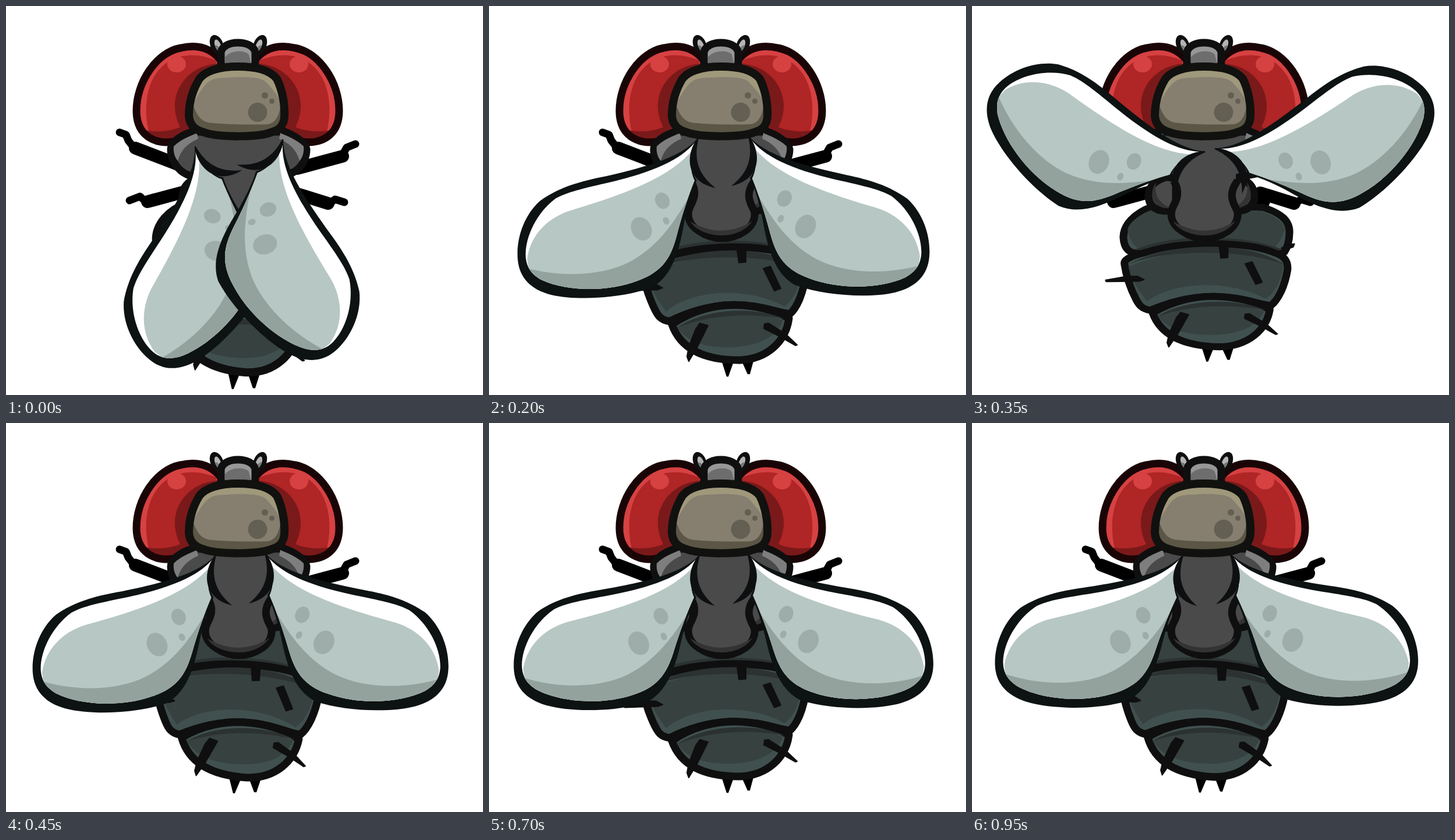
An HTML page that plays this animation: 819 px wide and 668 px high, repeating every 1000 ms.

```html
<!DOCTYPE html>
<html>
<head>
<meta charset="utf-8">
<title>Fly</title>
<style>
html, body { margin: 0; width: 100%; height: 100%; overflow: hidden; background: #fff; }
svg { display: block; width: 100vw; height: 100vh; }
.leg path { fill: none; stroke: #000; stroke-linecap: round; stroke-linejoin: round; stroke-width: 13; }
.leg .thick { stroke-width: 22; }
.line { stroke: #0f0f0f; stroke-width: 13; stroke-linejoin: round; }
.light { fill: #40504f; }
.main { fill: #364140; }
.shade { fill: #2b3231; }
.gray { fill: #4a4a4a; }
.dark { fill: #333; }
.rim { fill: #7e7e7e; }
</style>
</head>
<body>
<svg viewBox="0 0 819 668">
<defs>
  <path id="eyeShape" d="M371 96C352 70 326 66 300 72C257 80 224 132 224 180C224 215 245 233 275 234C295 234 310 225 322 213Z"/>
  <path id="headShape" d="M398 104C435 104 455 112 465 125C475 145 479 170 478 190C477 205 470 212 458 216C435 226 365 226 340 217C325 213 315 205 314 188C314 165 320 145 332 125C342 112 365 104 398 104Z"/>
  <path id="wingShape" d="M357 234C330 262 280 280 190 292C150 298 130 301 110 310C75 332 52 373 51 405C51 425 60 437 75 447C115 470 185 478 240 462C285 450 300 425 312 392C325 355 338 325 351 299C345 285 344 260 357 234Z"/>
  <clipPath id="eyeClip"><use href="#eyeShape"/></clipPath>
  <clipPath id="headClip"><use href="#headShape"/></clipPath>
  <clipPath id="wingClip"><use href="#wingShape"/></clipPath>

  <g id="eye">
    <use href="#eyeShape" fill="#d64142"/>
    <g clip-path="url(#eyeClip)">
      <path fill="#b02525" d="M362 94C282 60 224 120 245 216L320 222Z"/>
      <ellipse cx="293" cy="100" rx="16" ry="14" fill="#d64142"/>
      <path fill="#7a191a" d="M368 99C315 98 270 150 299 208C280 216 260 217 238 213L265 245L335 230Z"/>
    </g>
    <use href="#eyeShape" fill="none" stroke="#1a0506" stroke-width="13"/>
  </g>
  <g id="feeler">
    <ellipse cx="362" cy="67" rx="11" ry="18" transform="rotate(-22 362 67)" fill="#0f0f0f"/>
    <ellipse cx="364" cy="68" rx="5" ry="11" transform="rotate(-22 364 68)" fill="#b4b4b4"/>
    <path fill="#777" d="M359 68C362 66 368 72 370 79C364 78 360 74 359 68Z"/>
  </g>
  <path id="collar" class="rim" d="M288 241C300 229 315 224 328 218L330 228C312 236 300 247 295 266C289 259 287 250 288 241Z"/>
  <g id="lobe">
    <path class="line gray" d="M350 290C320 295 303 305 303 328C305 350 325 355 350 350Z"/>
    <path class="dark" d="M316 303C312 325 322 340 342 347L330 347C308 342 304 320 316 303Z"/>
  </g>
  <g id="wing">
    <path fill="#0d1213" d="M361 229C330 256 280 268 190 280C150 285 116 292 83 312C54 334 37 373 37 408C37 440 55 462 90 474C130 487 205 491 262 476C300 459 315 415 327 370C335 342 345 315 355 299C342 275 343 255 361 229Z"/>
    <use href="#wingShape" fill="#fff"/>
    <g clip-path="url(#wingClip)">
      <path fill="#b7c7c3" d="M358 240C320 284 250 308 140 331C100 338 62 365 53 410L60 490H300L370 300Z"/>
      <path fill="#93a29d" d="M50 424C110 446 180 449 230 428C275 408 305 375 338 328L330 420L250 500H60Z"/>
      <g fill="#9fadaa">
        <ellipse cx="253" cy="374" rx="17" ry="21" transform="rotate(-25 253 374)"/>
        <ellipse cx="293" cy="329" rx="12" ry="14.5" transform="rotate(-22 293 329)"/>
        <ellipse cx="296.500" cy="364" rx="5.200" ry="6.800" transform="rotate(-25 296.500 364)"/>
      </g>
    </g>
    <path fill="#0d0f10" d="M362 227C338 255 336 300 386 315C363 294 350 268 364 228Z"/>
  </g>
</defs>

<g class="leg">
  <path class="thick" d="M295 272L222 244"/><path d="M217 240L210 231L206 221L195 217"/>
  <path class="thick" d="M500 279L578 258"/><path d="M577 257L585 243L600 237"/>
  <path class="thick" d="M310 318L243 336"/><path d="M240 336L230 327L212 334"/>
  <path class="thick" d="M495 321L553 339"/><path d="M554 340L565 332L581 337"/>
  <path class="thick" d="M493 355L505 325"/>
</g>

<g id="tail">
  <path d="M399 606H421L411 634H408ZM435 610L455 604L448 630H444Z"/>
  <path class="line light" d="M310 346C278 359 261 382 261 404C262 420 268 430 278 433L538 427C545 415 546 402 546 390C546 367 530 354 500 344Z"/>
  <path class="main" d="M310 352C285 362 268 380 268 392C274 415 282 424 295 428L520 420C530 408 536 395 538 382C530 366 515 356 490 350Z"/>
  <path class="shade" d="M280 428C340 396 470 394 535 422L520 428H290Z"/>
  <path class="line light" d="M264 455C262 448 270 440 300 432C360 409 470 407 520 428C540 434 545 445 544 460C540 490 530 515 517 527C500 527 470 512 420 512C380 512 340 525 310 540C295 538 290 530 285 520C275 500 268 480 264 455Z"/>
  <path class="main" d="M271 460C340 420 480 420 537 448C534 480 525 500 508 515C450 482 355 482 304 523C290 505 275 480 271 460Z"/>
  <path class="shade" d="M271 455C340 410 480 406 537 450C480 425 340 422 271 455Z"/>
  <path class="line light" d="M314 545C350 520 390 512 420 512C455 512 490 520 515 535C510 572 480 604 430 606C375 606 330 590 314 545Z"/>
  <path class="main" d="M324 552C370 520 460 520 505 538C495 565 465 584 410 584C375 584 345 578 324 552Z"/>
  <path class="shade" d="M321 552C370 516 460 514 508 536C460 526 380 526 321 552Z"/>
  <g fill="#0f0f0f" stroke="#0f0f0f" stroke-linejoin="round" stroke-width="2">
    <path d="M232 485L270 477H287L298 483L290 486L233 488Z"/>
    <path d="M362 543L376 547L357 585L343 608L340 600L343 583L355 553Z"/>
    <path d="M473 544L480 543L510 562L529 580L526 581L500 566L472 552Z"/>
    <path d="M471 450L483 446L501 484L490 488Z"/>
    <path d="M426 418H441V439L429 440Z"/>
    <path d="M533 419L547 412L555 411L553 417L536 424Z"/>
  </g>
</g>

<use href="#eye"/>
<use href="#eye" transform="translate(796) scale(-1 1)"/>
<use href="#lobe"/>
<use href="#lobe" transform="translate(788) scale(-1 1)"/>
<path class="line gray" d="M320 216C300 222 283 234 283 246C283 265 295 283 312 290L350 296H448L488 288C507 281 516 262 516 246C514 234 495 222 478 216Z"/>
<use href="#collar"/>
<use href="#collar" transform="translate(799) scale(-1 1)"/>
<path class="gray" d="M345 230H453V300L446 335L455 365L400 399L342 365L352 335Z"/>
<path class="line gray" d="M346 300C358 319 352 332 345 345C338 360 344 376 360 386C385 403 415 403 440 386C455 376 460 358 453 347C445 332 442 319 456 300"/>
<path class="dark" d="M346 370C380 391 420 391 452 369C445 382 425 394 400 394C375 394 352 383 346 370Z"/>

<g id="left"><use href="#wing"/></g>
<g id="right"><use href="#wing"/></g>

<use href="#feeler"/>
<use href="#feeler" transform="translate(798) scale(-1 1)"/>
<path class="line" fill="#979797" d="M369 104V80C371 68 385 63 398 63C412 63 426 68 428 80V104Z"/>
<path fill="#6d6d6d" d="M376 100V88C385 75 412 75 417 84L421 100Z"/>
<use href="#headShape" fill="#a0987b"/>
<g clip-path="url(#headClip)">
  <path fill="#867f70" d="M320 170C345 125 350 125 375 123C410 121 435 121 446 130C460 145 468 155 474 170V220H320Z"/>
  <path fill="#5b5645" d="M320 164C328 195 340 200 355 201C390 204 430 204 450 203C465 200 470 185 472 165L485 235H310Z"/>
  <g fill="#635f53">
    <circle cx="432" cy="182.500" r="16.500"/>
    <circle cx="444.500" cy="153.500" r="5.500"/>
    <circle cx="456.500" cy="163.500" r="4.500"/>
  </g>
</g>
<use href="#headShape" fill="none" stroke="#11110f" stroke-width="14"/>
</svg>
<script>
const [tail, left, right] = ['tail', 'left', 'right'].map(id => document.getElementById(id));
const STEP = 50, LOOP = 1000;
const REST = -48.5;
const LIFT = [0, 46.8, 92.2, 95.7, 42.6]; // wing lift in degrees over one beat

function pose(node, transform) { node.setAttribute('transform', transform); }

function draw(now) {
  const k = Math.floor(now % LOOP / STEP);
  const gain = 1 + 0.12 * k * STEP / LOOP; // beats grow wider through the loop
  const a = REST + LIFT[k % 5] * gain;
  const sway = 1.8 + 2.22 * Math.cos(k * Math.PI / 5);
  pose(left, `rotate(${a} ${a < 0 ? '359 277' : '356 281'})`);
  pose(right, `translate(805.5 -3) scale(-1 1) rotate(${a * 0.96} 351.5 268)`);
  pose(tail, `translate(400 344) scale(1 ${1 - a * 0.0017}) rotate(${sway}) translate(-400 -344)`);
}

const start = performance.now();
function tick() {
  draw(performance.now() - start);
  requestAnimationFrame(tick);
}
tick();
</script>
</body>
</html>
```
